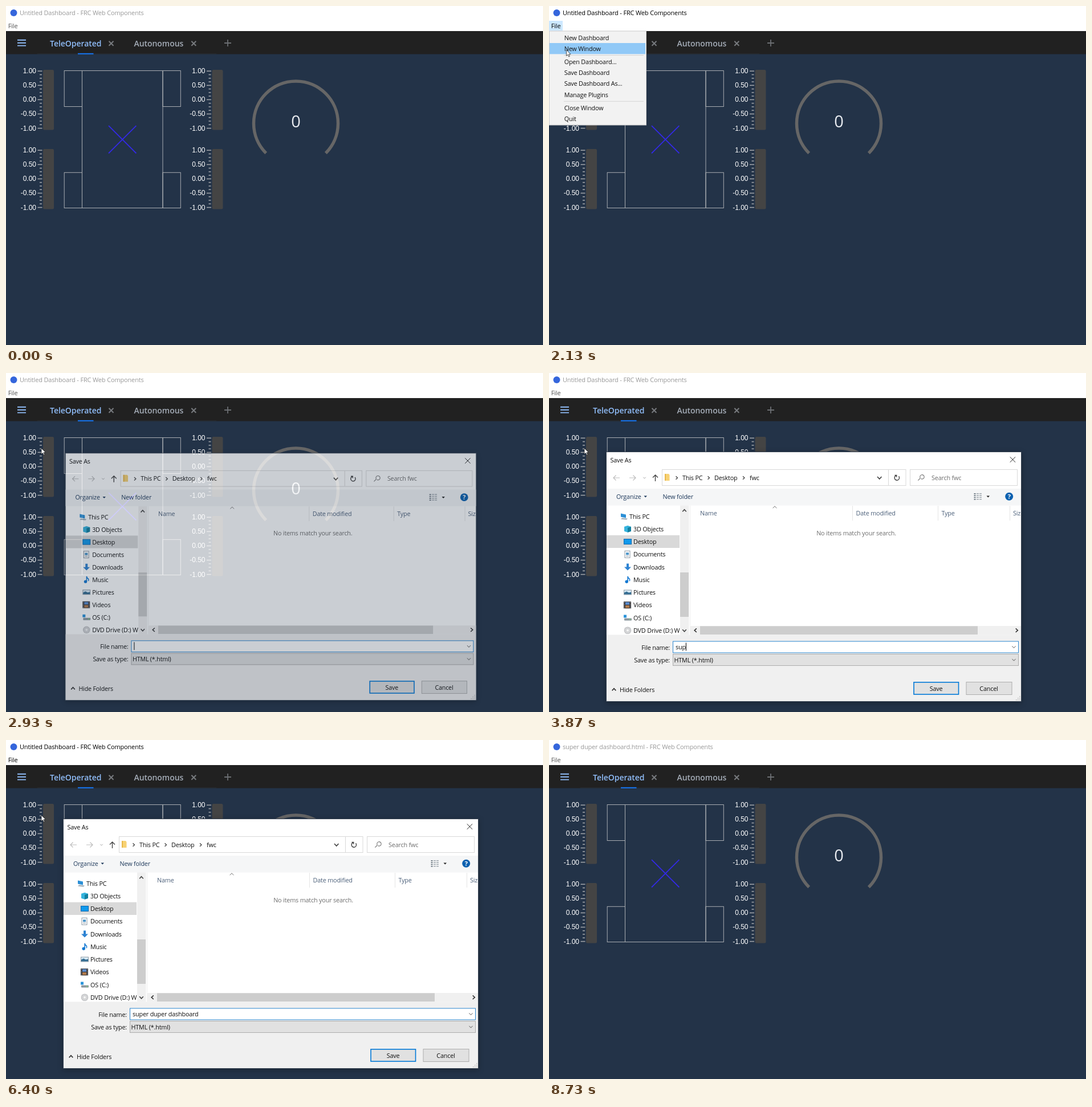
These frames come from a looping animation (942x595 px, 8.87 s). An HTML page:

```html
<!DOCTYPE html>
<html lang="en">
<head>
<meta charset="utf-8">
<title>Save dashboard</title>
<style>
html, body { margin: 0; width: 100%; height: 100%; overflow: hidden; background: #233348; }
svg { display: block; width: 942px; height: 595px; }
text { font: 10.8px "Open Sans", "Noto Sans", sans-serif; letter-spacing: -.17px; white-space: pre; }
.title { font-size: 11px; letter-spacing: -.16px; }
.tab { font-size: 14px; font-weight: 600; letter-spacing: -.05px; }
.axis { font: 12px "Liberation Sans", Arial, sans-serif; letter-spacing: 0; }
.value { font-size: 29px; letter-spacing: 0; }
.help { font-size: 11px; font-weight: 700; }
#dialog { filter: drop-shadow(0 2px 5px rgba(0, 0, 0, .3)); }
</style>
</head>
<body>
<svg id="stage" viewBox="0 0 942 595" xmlns="http://www.w3.org/2000/svg"></svg>
<script>
const STEP = 1000 / 15, LOOP = 8870;
const stage = document.getElementById('stage');

// Shape helpers
const rect = (x, y, w, h, fill, more = '') =>
  `<rect x="${x}" y="${y}" width="${w}" height="${h}" fill="${fill}" ${more}/>`;
const frame = (x, y, w, h, fill, stroke, sw = 1) =>
  rect(x, y, w, h, fill, `stroke="${stroke}" stroke-width="${sw}"`);
const line = (d, stroke, sw = 1, more = '') =>
  `<path d="${d}" fill="none" stroke="${stroke}" stroke-width="${sw}" ${more}/>`;
const solid = (d, fill) => `<path d="${d}" fill="${fill}"/>`;
const dot = (x, y, r, fill) => `<circle cx="${x}" cy="${y}" r="${r}" fill="${fill}"/>`;
const text = (x, y, s, fill = '#111', more = '') =>
  `<text x="${x}" y="${y}" fill="${fill}" ${more}>${s}</text>`;
const group = (id, body, more = '') => `<g id="${id}" ${more}>${body}</g>`;
const chevron = (x, y, dir, r = 3, color = '#444', sw = 1.3) => {
  const h = r * 1.1;
  const d = {
    up: `M${x - r} ${y + h / 2}l${r} ${-h}l${r} ${h}`,
    down: `M${x - r} ${y - h / 2}l${r} ${h}l${r} ${-h}`,
    left: `M${x + h / 2} ${y - r}l${-h} ${r}l${h} ${r}`,
    right: `M${x - h / 2} ${y - r}l${h} ${r}l${-h} ${r}`
  }[dir];
  return line(d, color, sw);
};
const cross = (x, y, r, color, sw) =>
  line(`M${x - r} ${y - r}l${2 * r} ${2 * r}m0 ${-2 * r}l${-2 * r} ${2 * r}`, color, sw);

// Window and dashboard
function speedBar(x, y) {
  let out = rect(x, y, 19, 105.5, '#444', 'rx="2.5"');
  for (let i = 0; i <= 16; i++) {
    const ty = y + 2.2 + i * 6.27, major = i % 4 === 0;
    out += rect(x - (major ? 9.5 : 6), ty - .7, major ? 8 : 4, 1.5, '#a3a6aa');
    if (major) out += text(x - 12, ty + 4, (1 - i / 8).toFixed(2), '#fff', 'class="axis" text-anchor="end"');
  }
  return out;
}

function dashboard() {
  const box = (x, y, w, h) => frame(x, y, w, h, 'none', '#a9adb2');
  return rect(0, 0, 942, 595, '#233348') + rect(0, 0, 942, 44, '#fff') +
    dot(13.5, 12, 6, '#3566dc') +
    rect(0, 44, 942, 40.5, '#212121') + rect(55, 83.5, 314, 1, '#2b3139') +
    rect(126, 82.8, 27.5, 2, '#1676f3') +
    line('M20 59.8h15M20 64.7h15M20 69.6h15', '#90bdf9', 1.9) +
    text(77, 70.5, 'TeleOperated', '#90bdf9', 'class="tab"') +
    text(224.5, 70.5, 'Autonomous', '#a5adb8', 'class="tab"') +
    cross(184.5, 65.7, 4, '#777a7e', 2) + cross(329.3, 65.7, 4, '#777a7e', 2) +
    line('M383 65h12M389 59v12', '#6b6e72', 1.8) +
    speedBar(65, 112) + speedBar(65, 251) + speedBar(361.5, 112) + speedBar(361.5, 251) +
    box(133.5, 113.5, 141.5, 241) +
    [102.2, 275].map(x => box(x, 113.5, 31.3, 63) + box(x, 292.3, 31.3, 62.2)).join('') +
    cross(204.2, 234.3, 24.2, '#3329e6', 1.8) +
    line('M456.2 258.3A74 74 0 1 1 560.8 258.3', '#666', 5.5) +
    text(508.5, 213.3, '0', '#e8ebf0', 'class="value" text-anchor="middle"');
}

// File menu: label and row centre
const MENU = [['New Dashboard', 55.5], ['New Window', 74.7], ['Open Dashboard...', 98],
  ['Save Dashboard', 117], ['Save Dashboard As...', 136], ['Manage Plugins', 155.5],
  ['Close Window', 179], ['Quit', 198]];
const ROW = 19.4;
const label = ([s, y]) => text(26.7, y + 4, s);
const bar = (y, more) => rect(1, y - ROW / 2, 168, ROW, '#91c9f7', more);
const menu = () => frame(.5, 44, 170, 165, '#f2f2f2', '#ccc') + bar(0, 'id="hover"') +
  line('M26 86.5h140M26 167.3h140', '#d4d4d4') + MENU.map(label).join('');
const picked = () => bar(136) + label(MENU[4]);

// Save dialog
function tree() {
  const names = ['This PC', '3D Objects', 'Desktop', 'Documents', 'Downloads', 'Music',
    'Pictures', 'Videos', 'OS (C:)', 'DVD Drive (D:) W'];
  const icons = [
    y => solid(`M126 ${y - 5}l9 2v6l-9 -2z`, '#2b8fd6') + solid(`M128 ${y + 3}l10 1l-2 2l-10 -1z`, '#9aa9b5'),
    y => solid(`M132 ${y - 4}l6 -2l6 2v8l-6 2l-6 -2z`, '#35b3dd') + solid(`M138 ${y - 2}l6 -2v8l-6 2z`, '#137f9f'),
    y => frame(131.5, y - 4.5, 13, 9, '#1199ec', '#0a68ae'),
    y => frame(133, y - 6, 9, 12, '#fff', '#8b97a2') + rect(135, y - 3, 5, 4, '#4a94c8') + rect(135, y + 2.5, 5, 1, '#8b97a2'),
    y => solid(`M136 ${y - 6}h4v6h4l-6 6l-6 -6h4z`, '#2e83d3'),
    y => dot(136.2, y + 3.5, 2.7, '#1479d2') + line(`M138.2 ${y + 3}v-9q0 3 3 4.5q1 2 0 4`, '#1479d2', 1.6),
    y => frame(131.5, y - 4, 13, 8, '#d9ebf6', '#8f9ba5') + solid(`M132 ${y + 3.5}v-3l4 -2l4 2l4 -1v4z`, '#356d92'),
    y => rect(131, y - 6, 13, 12, '#2a2a2e') + rect(134, y - 5, 7, 4.5, '#5b8dd0') + rect(134, y + .5, 7, 4.5, '#b37c4c') +
      line(`M132.5 ${y - 5}v11M142.5 ${y - 5}v11`, '#ccc', 1, 'stroke-dasharray="1.5"'),
    y => rect(132, y + 1, 13, 4, '#8c979f', 'rx="1"') + rect(131, y - 5, 5, 5, '#2a94da') + dot(142, y + 3, 1, '#7be06c'),
    y => dot(138, y, 6.3, '#b7b9bb') + dot(138, y, 5.5, '#d3d4d6') + dot(138, y, 2, '#f4f4f4')
  ];
  return `<g clip-path="url(#treeClip)">` + rect(101, 284.7, 128, 22.3, '#d9d9d9') +
    names.map((s, i) => {
      const y = 251.5 + i * 22.25;
      return icons[i](y) + text(i ? 148 : 141, y + 4, s);
    }).join('') + '</g>';
}

function form() {
  const right = 'text-anchor="end"', mid = 'text-anchor="middle"';
  const grip = [[0, 0], [3, 0], [6, 0], [0, 3], [3, 3], [0, 6]];
  return text(212, 485.5, 'File name:', '#111', right) + text(212, 507.8, 'Save as type:', '#111', right) +
    frame(217.5, 471, 606, 20, '#fff', '#2b86cf') + frame(217.5, 493.5, 606, 20, '#e1e1e1', '#adadad') +
    chevron(815.5, 481, 'down', 3, '#555', 1) + chevron(815.5, 503.5, 'down', 3, '#555', 1) +
    text(222, 485, '', '#111', 'id="name"') + rect(222, 473.5, 1, 14, '#000', 'id="caret"') +
    text(219.5, 507.5, 'HTML (*.html)') +
    chevron(114, 555.5, 'up', 3.3, '#333', 1.7) + text(124, 559.7, 'Hide Folders') +
    frame(640, 542.8, 78.5, 21.2, '#e1e1e1', '#0078d7', 1.6) + text(679, 557.7, 'Save', '#111', mid) +
    frame(732, 542.5, 80, 22, '#e1e1e1', '#adadad') + text(771.5, 557.7, 'Cancel', '#111', mid) +
    grip.map(([x, y]) => rect(825 - x, 573 - y, 1.5, 1.5, '#bbb')).join('');
}

function dialog() {
  const gray = '#6d6d6d', head = '#4c607a', tool = '#1e395b', rule = '#d9d9d9';
  return frame(100.5, 138.5, 728, 438, '#fff', '#3a4655') +
    text(107.5, 157, 'Save As') + cross(813.4, 152, 4.7, '#222', 1) +
    line('M124 184h-11m4.5 -4.5l-4.5 4.5l4.5 4.5M141 184h11m-4.5 -4.5l4.5 4.5l-4.5 4.5', '#bdbdbd', 1.2) +
    chevron(167.5, 184, 'down', 2.2, '#aaa', 1) +
    line('M186.5 190v-11m-4.5 4.5l4.5 -4.5l4.5 4.5', '#444', 1.4) +
    frame(198.5, 169.5, 427.5, 28, '#fff', rule) + line('M595.5 170v27', rule) +
    solid('M203 177h7l1.5 2v10h-8.5z', '#f7d274') + rect(203, 177, 2, 12, '#e8b84a') +
    chevron(224, 184, 'right', 2.7) + text(234, 187.7, 'This PC') +
    chevron(280, 184, 'right', 2.7) + text(290, 187.7, 'Desktop') +
    chevron(341.5, 184, 'right', 2.7) + text(352, 187.7, 'fwc') +
    chevron(579.7, 184, 'down', 3.7, '#444', 1.7) +
    line('M613.5 181.2a4.2 4.2 0 1 1 -4.5 -1.2M606.5 179.5h3.2v3.2', '#444', 1.4) +
    frame(633.5, 169.5, 188, 28, '#fff', rule) +
    line('M651.3 184.3a3.7 3.7 0 1 1 1.2 1.2M651.5 184.5l-4.2 4.2', '#777', 1.1) +
    text(671, 187.7, 'Search fwc', gray) +
    rect(101, 203, 727, 29.5, '#f5f6f7') +
    text(118, 221, 'Organize', tool) + solid('M166.5 215.5h5.5l-2.75 3z', tool) +
    text(199.5, 221, 'New folder', tool) +
    [0, 3.3, 6.6, 9.9].map(y => rect(745.5, 211 + y, 3, 1.8, '#6c7781') +
      rect(750, 211 + y, 4, 1.4, '#9ba3aa') + rect(755, 211 + y, 4, 1.4, '#9ba3aa')).join('') +
    solid('M767.5 215.5h5.5l-2.75 3z', '#222') + dot(807.2, 216.7, 7, '#0b61b0') +
    text(807.2, 220.7, '?', '#fff', 'class="help" text-anchor="middle"') +
    rect(230, 232.5, 15.5, 227, '#f0f0f0') + rect(230, 350, 15, 78, '#cdcdcd') +
    chevron(237.5, 241.5, 'up', 3.3, '#444', 1.6) + chevron(237.5, 452, 'down', 3.3, '#444', 1.6) +
    line('M247.5 232.5v211', '#eee') +
    text(265, 250, 'Name', head) + text(538.5, 250, 'Date modified', head) + text(688.5, 250, 'Type', head) +
    `<g clip-path="url(#dialogClip)">${text(814, 250, 'Size', head)}</g>` +
    line('M532.5 233v26M682.5 233v26M808.5 233v26', '#e5e5e5') +
    chevron(396, 235.5, 'up', 3.3, '#777', 1) +
    text(539, 284.5, '', gray, 'id="note" text-anchor="middle"') +
    rect(247, 444, 581, 15.5, '#f0f0f0') + rect(265, 444.3, 487, 14.8, '#cdcdcd') +
    chevron(257, 451.7, 'left', 3.3, '#333', 1.6) + chevron(820.5, 451.7, 'right', 3.3, '#333', 1.6) +
    group('fill', rect(101, 459.5, 727, 116.5, '#f0f0f0') + tree() + form());
}

stage.innerHTML =
  `<defs><clipPath id="treeClip"><path d="M101 233h129v226.5h-129z"/></clipPath>` +
  `<clipPath id="dialogClip"><path d="M101 139h727v437h-727z"/></clipPath></defs>` +
  dashboard() + rect(0, 26, 24, 17.5, '#cce8ff', 'id="fileBg"') +
  text(24, 16.2, '', '#000', 'id="title" class="title"') + text(3.7, 38.7, 'File', '#000', 'id="file" class="title"') +
  group('menu', menu()) + group('picked', picked()) + group('dialog', dialog()) +
  group('cursor', '<path d="M0 0v10.5l2.5 -2.3l1.7 3.8l1.7 -.8l-1.7 -3.6h3.4z" fill="#fff" stroke="#111" stroke-width=".7"/>');

const el = {};
stage.querySelectorAll('[id]').forEach(n => el[n.id] = n);
const show = (node, a) => {
  node.style.display = a > 0 ? '' : 'none';
  node.style.opacity = a;
};

// Timing tables, in steps of 1/15 s
const easeOut = u => 1 - (1 - u) ** 2;
const smooth = u => u * u * (3 - 2 * u);
const MOVES = [ // first step, last step, from, to, ease, sideways bow
  [1, 6, [934, 586], [130, 259], u => easeOut((u * 6 - 1) / 5), 0],
  [10, 23, [130, 259], [10, 41.5], smooth, 0],
  [30, 36, [10, 41.5], [62, 132], smooth, 0],
  [108, 116, [62, 132], [134, 454], smooth, 35],
  [120, 127, [134, 454], [52, 597], smooth, 0]
];
const KEYS = [[50, 1], [52, 2], [58, 3], [60, 4], [61, 5], [62, 6], [64, 7], [70, 8], [73, 9], [75, 10],
  [76, 11], [77, 12], [79, 13], [82, 14], [84, 15], [86, 17], [89, 19], [91, 20], [94, 21]];
const POSE = { // dialog: opacity, scale
  42: [.06, .953], 43: [.4, .973], 44: [.76, .99], 45: [.93, .997],
  97: [.7, .98], 98: [.25, .955]
};
const MENU_IN = { 24: .25, 25: .5, 26: .8 };
const PICKED = { 40: .75, 41: .5, 42: .24 };
const NAME = 'super duper dashboard';

function cursorAt(n) {
  const [a, b, p, q, ease, bow] = MOVES.filter(m => m[0] <= n).pop();
  const e = ease(Math.min(1, (n - a + 1) / (b - a + 1)));
  return [p[0] + (q[0] - p[0]) * e + bow * Math.sin(Math.PI * e), p[1] + (q[1] - p[1]) * e];
}

function draw(n) {
  const active = (n >= 24 && n < 42) || (n >= 96 && n < 131);
  const open = n >= 24 && n < 40;
  el.title.textContent = (n < 99 ? 'Untitled Dashboard' : NAME + '.html') + ' - FRC Web Components';
  el.title.setAttribute('fill', active ? '#000' : '#999');
  el.file.setAttribute('fill', active ? '#000' : '#555');
  show(el.fileBg, open ? 1 : 0);

  const on = n >= 1 && n < 127;
  show(el.cursor, on ? 1 : 0);
  let y = 0;
  if (on) {
    const c = cursorAt(n);
    y = c[1];
    el.cursor.setAttribute('transform', `translate(${c[0]} ${y})`);
  }

  show(el.menu, open ? MENU_IN[n] ?? 1 : 0);
  const row = MENU.find(m => Math.abs(m[1] - y) <= ROW / 2);
  show(el.hover, row ? 1 : 0);
  if (row) el.hover.setAttribute('y', row[1] - ROW / 2);
  show(el.picked, PICKED[n] ?? 0);

  const [alpha, scale] = POSE[n] ?? [n > 45 && n < 97 ? 1 : 0, 1];
  show(el.dialog, alpha);
  if (!alpha) return;
  el.dialog.setAttribute('transform', `translate(464.5 357.5) scale(${scale}) translate(-464.5 -357.5)`);
  show(el.fill, n > 42 ? 1 : 0);
  el.note.textContent = n < 44 ? 'Working on it...' : 'No items match your search.';
  const key = KEYS.filter(k => k[0] <= n).pop();
  el.name.textContent = NAME.slice(0, key ? key[1] : 0);
  show(el.caret, n < 96 ? 1 : 0);
  el.caret.setAttribute('x', 222 + (key ? el.name.getComputedTextLength() : 0));
}

let last = -1;
const start = performance.now();
function tick() {
  const t = (performance.now() - start) % LOOP;
  const n = Math.min(132, Math.floor((t + 5) / STEP));
  if (n !== last) draw(last = n);
  requestAnimationFrame(tick);
}
tick();
</script>
</body>
</html>
```
